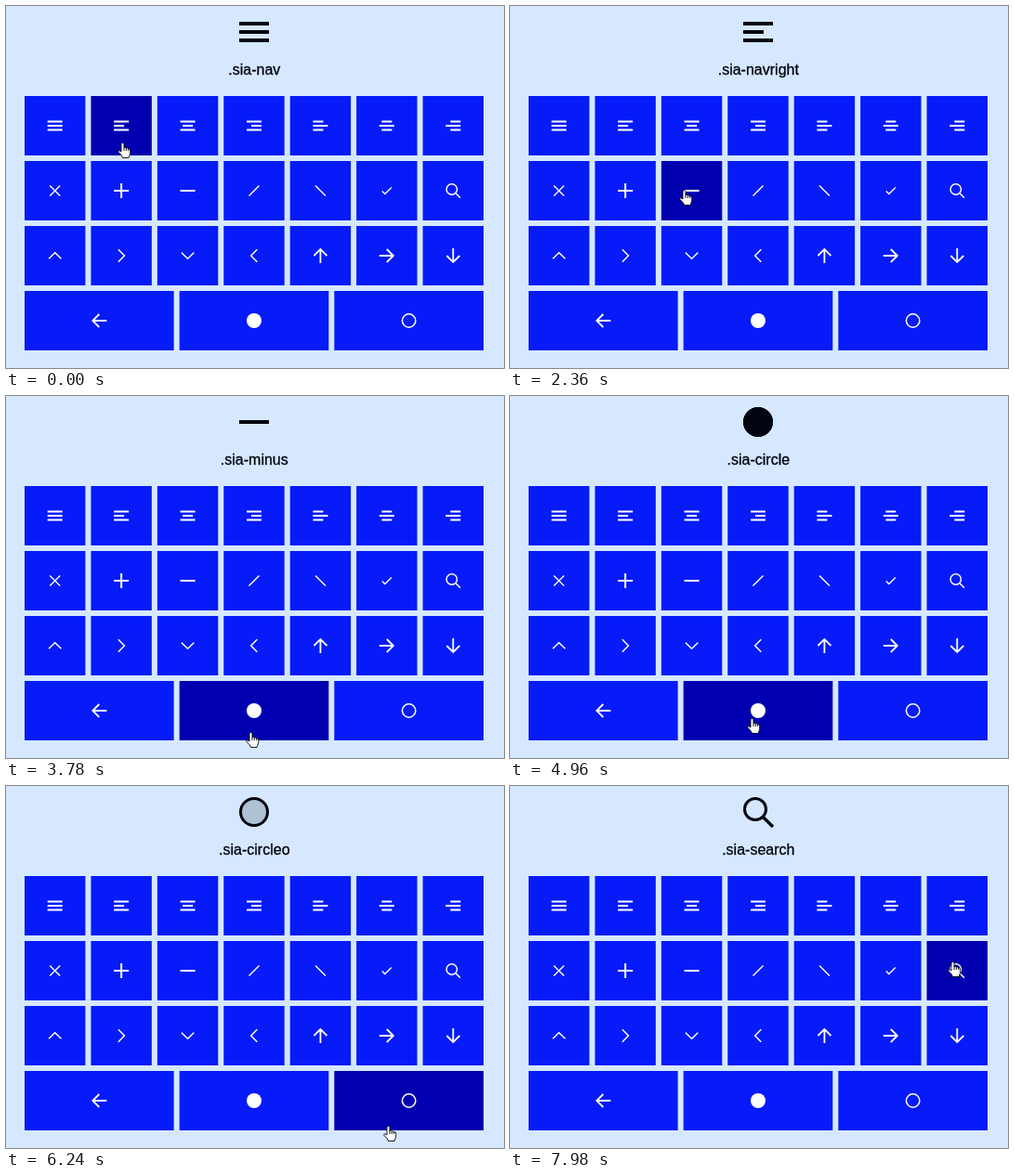
An HTML page with a canvas for the animation above (8000 ms loop, 536x390 px).

```html
<!DOCTYPE html>
<html lang="en">
<head>
<meta charset="utf-8">
<title>Icon morphing</title>
<style>
  html, body { margin: 0; width: 100%; height: 100%; overflow: hidden; background: #d6e8ff; }
  canvas { display: block; }
</style>
</head>
<body>
<canvas id="stage" width="536" height="390"></canvas>
<script>
const ctx = document.getElementById('stage').getContext('2d');
const LOOP = 8000, MORPH = 500;
const PAPER = '#d6e8ff', BLUE = '#061bf8', HOVER = '#0000b0', INK = '#02040f';

// Small icons are drawn around (0, 0); turn counts quarter turns
const icon = (path, line = 2, turn = 0, filled = false) =>
  ({ path: new Path2D(path), line, turn, filled });
const bars = (isShort, align) => icon([-1, 0, 1].map(i => {
  const width = isShort(i) ? 11 : 16;
  return `M${-8 + (16 - width) * align} ${i * 4.5}h${width}`;
}).join(''));
const middle = i => i === 0, outer = i => i !== 0;
const alignments = [0, .5, 1], turns = [0, 1, 2, 3];
const ring = r => `M${-r} 0a${r} ${r} 0 1 1 ${2 * r} 0a${r} ${r} 0 1 1 ${-2 * r} 0z`;
const minus = 'M-8 0H8', plus = minus + 'M0-8V8';
const slash = 'M-5.5 5.5L5.5-5.5', backslash = 'M-5.5-5.5L5.5 5.5';
const check = 'M-5 .5L-2 3.5L5-3.5';
const lens = 'M-7.2-1.5a5.7 5.7 0 1 1 11.4 0a5.7 5.7 0 1 1-11.4 0M2.5 2.5L7.6 7.6';
const chevrons = turns.map(turn => icon('M-6.7 3.3L0-3.3L6.7 3.3', 1.5, turn));
const arrows = turns.map(turn => icon('M0 8V-7M-7 0L0-7L7 0', 1.8, turn));

const rows = [
  [bars(() => false, 0), ...alignments.map(a => bars(middle, a)), ...alignments.map(a => bars(outer, a))],
  [icon(slash + backslash, 1.4), icon(plus), icon(minus), icon(slash, 1.4),
   icon(backslash, 1.4), icon(check, 1.4), icon(lens, 1.5)],
  [...chevrons, ...arrows.slice(0, 3)],
  [arrows[3], icon(ring(8), 0, 0, true), icon(ring(7.2), 1.5)]
];

const buttons = rows.flatMap((row, r) => row.map((glyph, c) => {
  const w = (494 - 6 * (row.length - 1)) / row.length;
  return { glyph, x: 20 + c * (w + 6), y: 97 + r * 70, w, h: 64 };
}));

// Large icon: main shape, two side bars at an offset, and a handle
const line = (w, offset) =>
  ({ y: 26, w, h: 4, radius: 0, fill: 1, offset, side: 32, handle: 0 });
const disc = (size, fill, handle = 0) =>
  ({ y: 12, w: size, h: size, radius: size / 2, fill, offset: 0, side: 0, handle });

const states = [
  { at: -MORPH, label: '.sia-nav',      shape: line(32, 9) },
  { at: 540,    label: '.sia-navright', shape: line(22, 9) },
  { at: 2540,   label: '.sia-minus',    shape: line(32, 0) },
  { at: 4090,   label: '.sia-circle',   shape: disc(32, 1) },
  { at: 5980,   label: '.sia-circleo',  shape: disc(32, 0) },
  { at: 7430,   label: '.sia-search',   shape: disc(26, 0, 11) }
];

// Cursor key points: time, x, y
const stops = [
  [0, 120, 147], [800, 120, 147], [1400, 167, 190], [2600, 184, 199],
  [3120, 220, 245], [3520, 258, 363], [4960, 255, 347], [5640, 403, 366],
  [6240, 406, 366], [6840, 506, 231], [7200, 470, 194], [LOOP, 471, 189]
];

const hand = new Path2D('M4 10V2C4 0 7 0 7 2V6Q8 4 9.3 6.4Q11 5 11.6 7Q13.7 6 13.7 8.5' +
  'V11.5Q13.5 13 12 16.5H5.5Q5 14 1 10.5Q0 7.5 4 10Z');
const creases = new Path2D('M7 6V9M9.3 6.4V9M11.6 7V9');

const mix = (a, b, k) => a + (b - a) * k;
const smooth = p => p * p * (3 - 2 * p);

// cubic-bezier(.25, .1, .25, 1)
function ease(p) {
  if (p <= 0 || p >= 1) return Math.min(1, Math.max(0, p));
  let lo = 0, hi = 1, s = .5;
  for (let i = 0; i < 20; i++) {
    s = (lo + hi) / 2;
    const x = .75 * s * (1 - s) ** 2 + .75 * s * s * (1 - s) + s ** 3;
    if (x < p) lo = s; else hi = s;
  }
  return .3 * s * (1 - s) ** 2 + 3 * s * s * (1 - s) + s ** 3;
}

function cursorAt(t) {
  const next = stops.findIndex(stop => stop[0] > t);
  const [t0, x0, y0] = stops[next - 1], [t1, x1, y1] = stops[next];
  const k = smooth((t - t0) / (t1 - t0));
  return [mix(x0, x1, k), mix(y0, y1, k)].map(Math.round);
}

function drawButton({ glyph, x, y, w, h }, tipX, tipY) {
  const over = tipX >= x && tipX < x + w && tipY >= y && tipY < y + h;
  ctx.fillStyle = over ? HOVER : BLUE;
  ctx.fillRect(x, y, w, h);
  ctx.save();
  ctx.translate(x + w / 2, y + h / 2);
  ctx.rotate(glyph.turn * Math.PI / 2);
  ctx.fillStyle = ctx.strokeStyle = '#fff';
  ctx.lineWidth = glyph.line;
  if (glyph.filled) ctx.fill(glyph.path); else ctx.stroke(glyph.path);
  ctx.restore();
}

function drawShape({ y, w, h, radius, fill, offset, side, handle }) {
  ctx.fillStyle = ctx.strokeStyle = INK;
  ctx.fillRect(251, 26 - offset, side, 4);
  ctx.fillRect(251, 26 + offset, side, 4);

  const outline = new Path2D();
  outline.roundRect(251, y, w, h, radius);
  ctx.globalAlpha = fill;
  ctx.fill(outline);
  ctx.globalAlpha = 1;
  if (h > 6) {
    outline.roundRect(254, y + 3, w - 6, h - 6, Math.max(0, radius - 3));
    ctx.fill(outline, 'evenodd');
  }
  ctx.lineWidth = handle && 3.4;
  if (handle) {
    ctx.beginPath();
    ctx.moveTo(272, 33);
    ctx.lineTo(272 + handle, 33 + handle);
    ctx.stroke();
  }
}

function drawHeader(t) {
  const i = states.findLastIndex(state => state.at <= t);
  const { at, label, shape } = states[i];
  const from = states[Math.max(0, i - 1)].shape;
  const k = ease((t - at) / MORPH);
  drawShape(Object.fromEntries(
    Object.keys(shape).map(key => [key, mix(from[key], shape[key], k)])));

  ctx.font = '16px "Liberation Sans", Arial, sans-serif';
  ctx.textAlign = 'center';
  ctx.lineWidth = .3;
  ctx.fillText(label, 267.3, 74);
  ctx.strokeText(label, 267.3, 74);
}

function drawCursor(x, y) {
  ctx.save();
  ctx.translate(x, y);
  ctx.fillStyle = '#fff';
  ctx.strokeStyle = '#000';
  ctx.lineWidth = .9;
  ctx.fill(hand);
  ctx.stroke(hand);
  ctx.stroke(creases);
  ctx.restore();
}

function frame() {
  const t = performance.now() % LOOP;
  const [x, y] = cursorAt(t);
  ctx.fillStyle = PAPER;
  ctx.fillRect(0, 0, 536, 390);
  drawHeader(t);
  buttons.forEach(button => drawButton(button, x + 5, y + 1));
  drawCursor(x, y);
  requestAnimationFrame(frame);
}
frame();
</script>
</body>
</html>
```
